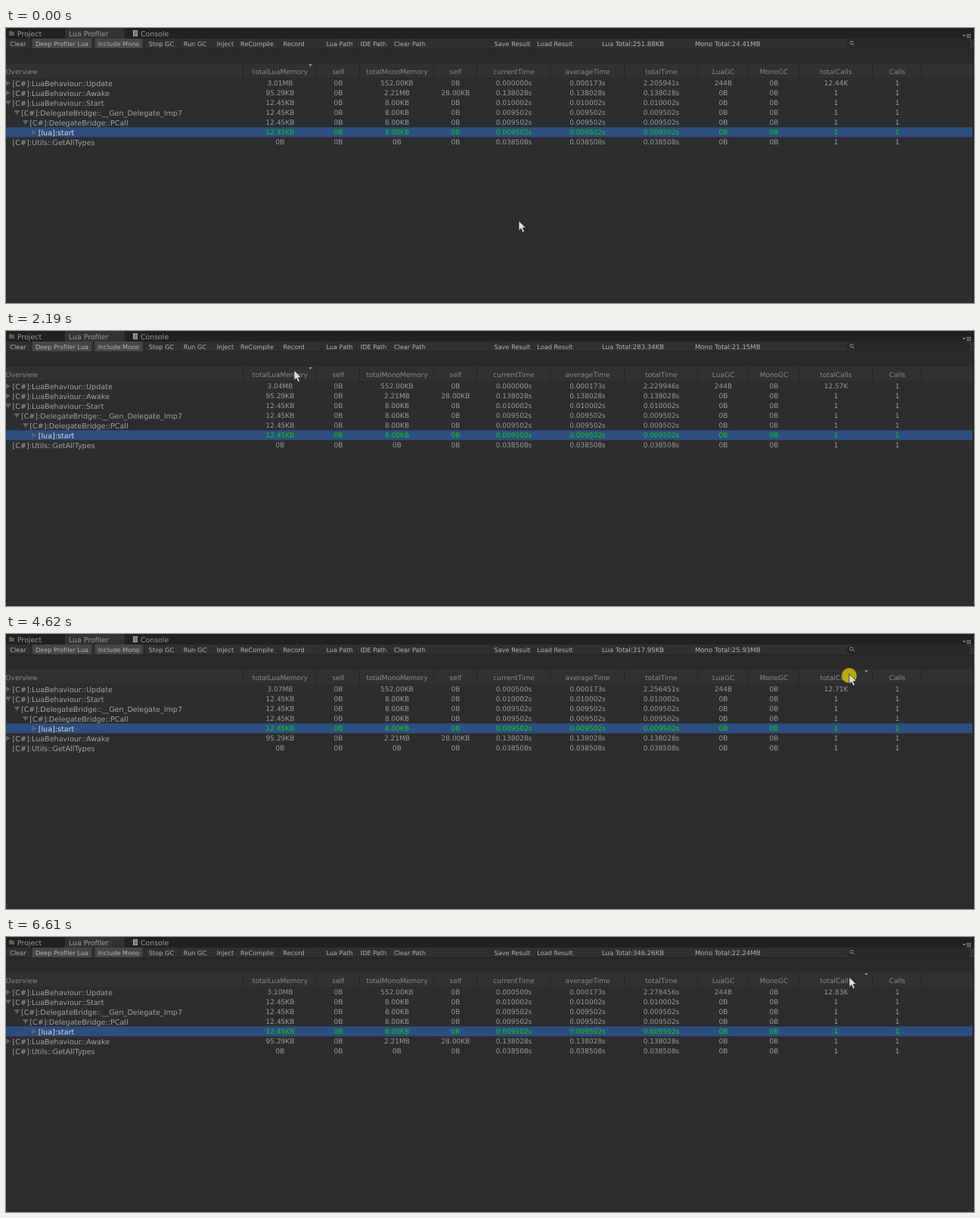
An HTML page that plays this animation: 1280x364 px, repeating every 6.73 s.

```html
<!DOCTYPE html>
<html lang="en">
<head>
<meta charset="utf-8">
<title>Lua Profiler</title>
<style>
  html, body { margin: 0; width: 100%; height: 100%; overflow: hidden; background: #2d2d2d; }
  svg { display: block; width: 1280px; height: 364px; }
  text { font: 9px "DejaVu Sans", Verdana, sans-serif; fill: #9b9b9b; text-rendering: geometricPrecision; white-space: pre; }
  .mid { text-anchor: middle; }
  .tab { font-size: 9.4px; fill: #9a9a9a; }
  .tool { font-size: 8.2px; fill: #b4b4b4; text-anchor: middle; }
  .total { font-size: 8.55px; fill: #b4b4b4; }
  .head { fill: #8a8a8a; }
  .name { font-size: 9.6px; fill: #a2a2a2; }
  .picked .name { fill: #dcdcdc; }
  .picked .cell { fill: #10cc10; }
  .fold { fill: #626262; }
</style>
</head>
<body>
<svg viewBox="0 0 1280 364">
  <rect width="1280" height="364" fill="#2d2d2d"/>
  <rect width="1280" height="14" fill="#212121"/>
  <path d="M78 14V3q0-3 3-3H154q3 0 3 3V14z" fill="#333"/>
  <rect y="14" width="1280" height="13" fill="#303030"/>
  <rect y="27" width="1280" height="1" fill="#222"/>
  <rect y="28" width="1280" height="19" fill="#2a2a2a"/>
  <rect y="47" width="1280" height="19" fill="#313131"/>
  <rect x="1278" y="28" width="1" height="336" fill="#232323"/>

  <path d="M4 4h3l1 1h3v5H4z" fill="#5c5c5c"/>
  <path d="M168 3h6v8h-6z" fill="#a2a2a2"/>
  <path d="M169.500 5h3.500M169.500 7h3.500M169.500 9h3.500" stroke="#333" stroke-width=".8"/>
  <path d="M1265 9h4l-2 2.500z" fill="#999"/>
  <path d="M1270 8.500h6M1270 10.500h6M1270 12.500h6" stroke="#8a8a8a"/>
  <rect x="1112.500" y="15.500" width="161" height="10" rx="5" fill="#282828" stroke="#202020"/>
  <g fill="none" stroke="#8a8a8a"><circle cx="1118" cy="19.500" r="2.200"/><path d="M1119.600 21.200l2.400 2.400"/></g>

  <g id="chrome"></g>
  <text id="luaTotal" class="total" x="788" y="23.600"></text>
  <text id="monoTotal" class="total" x="911" y="23.600"></text>
  <path id="caret" fill="#a0a0a0"/>
  <g id="rows"></g>
  <g id="pointer">
    <circle id="press" cx="0" cy="2" r="10" fill="#c8b80f" fill-opacity=".88"/>
    <path d="M0 0V13.200L3 10.400L5.200 15.500L7.500 14.500L5.300 9.600H9.300z" fill="#e0e0e0" stroke="#1c1c1c" stroke-width=".7"/>
  </g>
</svg>
<script>
const LOOP = 6730, STEP = 110.3;
const $ = id => document.getElementById(id);

function add(parent, tag, attrs, text = '') {
  const el = document.createElementNS('http://www.w3.org/2000/svg', tag);
  for (const key in attrs) el.setAttribute(key, attrs[key]);
  el.textContent = text;
  return parent.appendChild(el);
}

// Window chrome
const chrome = $('chrome');
const label = (cls, x, y, text) => add(chrome, 'text', { class: cls, x, y }, text);
const bar = (x, width, fill) => add(chrome, 'rect', { x, y: 14, width, height: 13, fill });
label('tab', 15, 10.5, 'Project');
label('tab', 83, 10.5, 'Lua Profiler');
label('tab', 178, 10.5, 'Console');

const tools = { 'Clear': 16, 'Deep Profiler Lua': 74, 'Include Mono': 149, 'Stop GC': 205.5, 'Run GC': 250,
  'Inject': 290, 'ReCompile': 332, 'Record': 380.5, 'Lua Path': 441, 'IDE Path': 486, 'Clear Path': 534,
  'Save Result': 669.5, 'Load Result': 726 };
for (const name in tools) {
  const text = label('tool', tools[name], 23.6, name);
  const width = text.getComputedTextLength() + 8;
  const left = tools[name] - width / 2;
  bar(Math.round(left - 2), 1, '#292929');
  if (/Deep|Include/.test(name)) bar(left, width, '#474747');
  chrome.append(text);
}

// Table
const edges = [313, 410, 467, 565, 622, 719, 817, 914, 981, 1048, 1145, 1210];
const centers = edges.slice(1).map((x, i) => (x + edges[i]) / 2 + 1);
const heads = ['totalLuaMemory', 'self', 'totalMonoMemory', 'self', 'currentTime', 'averageTime',
  'totalTime', 'LuaGC', 'MonoGC', 'totalCalls', 'Calls'];
label('head', -0.5, 61.3, 'Overview');
heads.forEach((name, i) => label('head mid', centers[i], 61.3, name));
for (const x of edges) add(chrome, 'rect', { x, y: 48, width: 1, height: 18, fill: '#242424' });

const OPEN = 'M-4 70h8l-4 6z', CLOSED = 'M-3 69.500v7l6-3.500z';

function makeRow(name, depth, fold, [lua, mono, monoSelf, now, avg, total, gc, count], picked) {
  const row = add($('rows'), 'g', { class: picked ? 'picked' : '' });
  if (picked) add(row, 'rect', { y: 66.4, width: 1278, height: 13, fill: '#2d4e80' });
  const indent = 11.4 * depth;
  if (fold) add(row, 'path', { class: 'fold', d: fold, transform: `translate(${3 + indent})` });
  add(row, 'text', { class: 'name', x: 8.5 + indent, y: 76.7 }, name);
  const values = [lua, '0B', mono, monoSelf, now, avg, total, gc, '0B', count, '1'];
  const cells = values.map((v, i) => add(row, 'text', { class: 'cell mid', x: centers[i], y: 75.8 }, v));
  return { row, cells };
}

const flat = (lua, mono, self, time) => [lua, mono, self, time, time, time, '0B', '1'];
const call = flat('12.45KB', '8.00KB', '0B', '0.009502s');
const update = makeRow('[C#]:LuaBehaviour::Update', 0, CLOSED,
  ['', '552.00KB', '0B', '', '0.000173s', '', '244B', '']);
const groups = {
  U: [update],
  A: [makeRow('[C#]:LuaBehaviour::Awake', 0, CLOSED, flat('95.29KB', '2.21MB', '28.00KB', '0.138028s'))],
  S: [
    makeRow('[C#]:LuaBehaviour::Start', 0, OPEN, flat('12.45KB', '8.00KB', '0B', '0.010002s')),
    makeRow('[C#]:DelegateBridge::__Gen_Delegate_Imp7', 1, OPEN, call),
    makeRow('[C#]:DelegateBridge::PCall', 2, OPEN, call),
    makeRow('[lua]:start', 3, CLOSED, call, true)
  ],
  G: [makeRow('[C#]:Utils::GetAllTypes', 0, null, flat('0B', '0B', '0B', '0.038508s'))]
};

// Step of each header click, resulting group order, sorted column
const sorts = [
  [0, 'UASG', 0], [15, 'GSAU', 0], [19, 'UASG', 0],
  [26, 'AUSG', 2], [30, 'GSUA', 2],
  [40, 'USAG', 9], [43, 'SGAU', 9], [47, 'USAG', 9]
];

// Pointer strokes: first step, last step, destination
const strokes = [[1, 7, 583, 165], [7, 13, 381, 52], [21, 24, 530, 59], [30, 35, 1078, 54], [37, 39, 1115, 53]];

function pointerAt(k) {
  let x = 678, y = 255;
  for (const [from, to, toX, toY] of strokes) {
    const p = Math.min(1, Math.max(0, (k - from) / (to - from)));
    x += (toX - x) * p;
    y += (toY - y) * p;
  }
  return `translate(${x} ${y})`;
}

function drawCounters(k) {
  // Mono memory climbs until a collection every 35 steps
  const mono = 19.2 + 0.217 * ((k + 24) % 35);
  $('luaTotal').textContent = `Lua Total:${(251.88 + 1.573 * k).toFixed(2)}KB`;
  $('monoTotal').textContent = `Mono Total:${mono.toFixed(2)}MB`;

  const set = (col, text) => { update.cells[col].textContent = text; };
  const busy = k % 9 > 2 && k % 9 < 8;
  const total = 2.205941 + 0.0005001 * Math.floor(2.42 * k);
  set(0, (3.01 + 0.0015 * k).toFixed(2) + 'MB');
  set(4, busy ? '0.000500s' : '0.000000s');
  set(6, total.toFixed(6) + 's');
  set(9, (12.441 + 0.00645 * k).toFixed(2) + 'K');
}

function drawTable(k) {
  const [, order, col] = sorts.findLast(([step]) => step <= k);
  [...order].flatMap(g => groups[g]).forEach(({ row }, i) =>
    row.setAttribute('transform', `translate(0 ${13 * i})`));
  const x = edges[col + 1] - 9.5;
  const ascending = 'GS'.includes(order[0]);
  $('caret').setAttribute('d', ascending ? `M${x} 51h4l-2-3z` : `M${x} 48h4l-2 3z`);
}

function draw(k) {
  drawCounters(k);
  drawTable(k);
  $('pointer').setAttribute('transform', pointerAt(k));
  const pressed = sorts.some(([step]) => k < step && k >= step - 2);
  $('press').style.display = pressed ? '' : 'none';
}

let shown = -1;
function tick() {
  const t = performance.now() % LOOP;
  const k = Math.min(60, Math.floor((t + 23) / STEP));
  if (k !== shown) draw(shown = k);
  requestAnimationFrame(tick);
}
tick();
</script>
</body>
</html>
```
